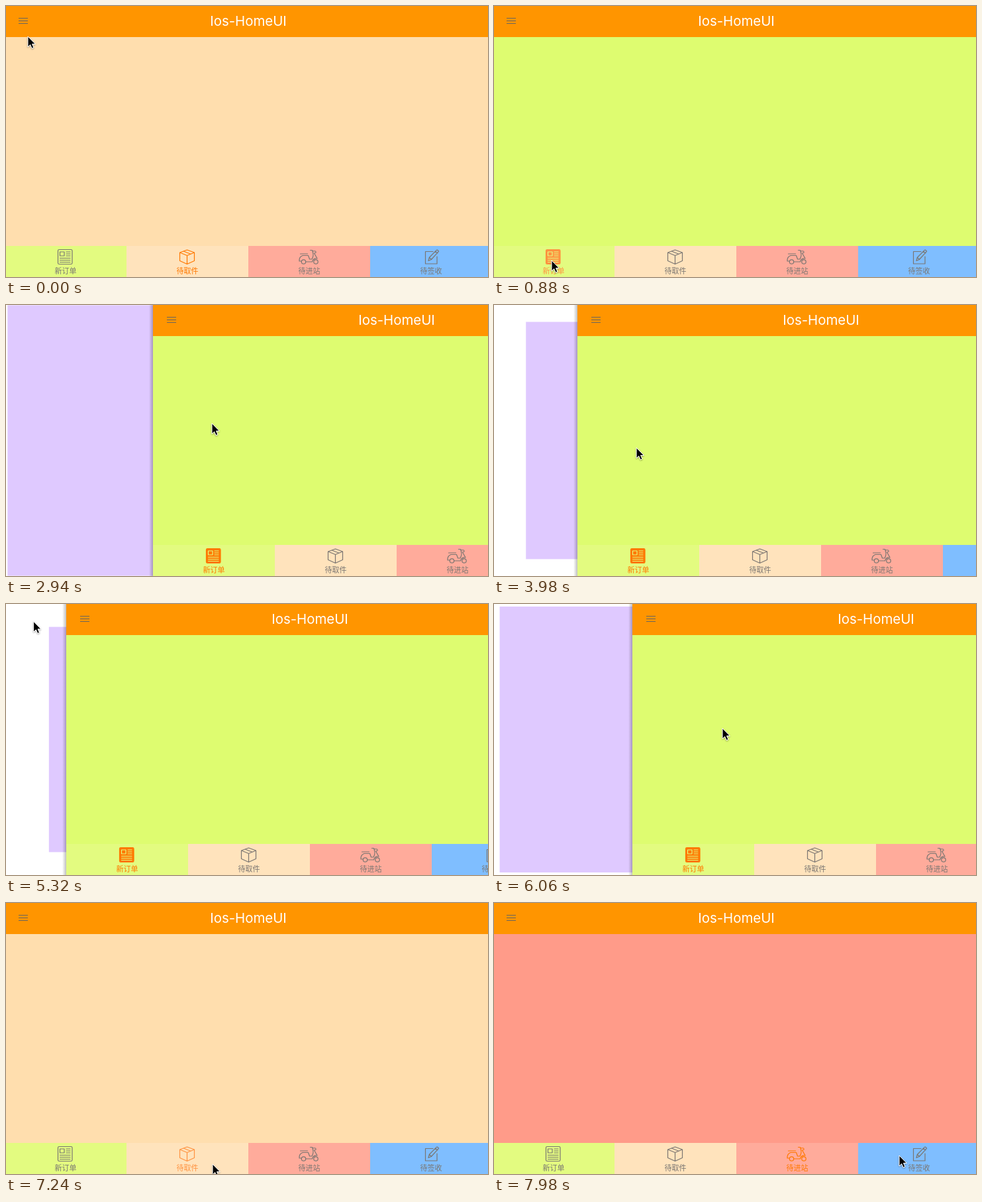
Animation, 728 px wide and 410 px high, one loop 8000 ms. Source, as an HTML page:

```html
<!DOCTYPE html>
<html lang="zh-CN">
<head>
<meta charset="utf-8">
<style>
  html, body { margin: 0; width: 100%; height: 100%; overflow: hidden; background: #fff; }
  svg { display: block; width: 728px; height: 410px; }
  .title { font: 20.4px Inter, "Liberation Sans", sans-serif; fill: #fff; text-anchor: middle; }
  .tab { color: #7a7672; }
  .tab.on { color: #ff7800; }
  .tab.pressed { color: #ff9340; }
  .tab text { font: 11px "Noto Sans CJK SC", "Noto Sans CJK", sans-serif; fill: currentColor; text-anchor: middle; }
  .icon { fill: none; stroke: currentColor; stroke-width: 1.2; stroke-linejoin: round; stroke-linecap: round; }
  .on .paper { fill: currentColor; }
  .on .print { stroke: #e3fb80; }
</style>
</head>
<body>
<svg viewBox="0 0 728 410">
  <defs>
    <linearGradient id="shade">
      <stop offset="0" stop-opacity="0"/>
      <stop offset="1" stop-opacity=".25"/>
    </linearGradient>
    <filter id="soft" x="-50%" y="-50%" width="200%" height="200%">
      <feDropShadow dx="0" dy="1" stdDeviation="1" flood-opacity=".4"/>
    </filter>
  </defs>

  <rect width="728" height="410" fill="#fff"/>
  <rect id="drawer" width="728" fill="#dfc9ff"/>

  <g id="page">
    <rect x="-6" width="6" height="410" fill="url(#shade)"/>
    <rect id="body" y="46" width="736" height="318"/>
    <rect width="736" height="47" fill="#ff9500"/>
    <path d="M21 18.5h14M21 22.5h14M21 26.5h14" stroke="#6b665e"/>
    <text class="title" x="368" y="30">Ios-HomeUI</text>

    <g class="tab" transform="translate(0 363)">
      <rect width="184" height="47" fill="#e3fb80"/>
      <g class="icon">
        <rect class="paper" x="80.5" y="5.5" width="21.5" height="22" rx="1.8"/>
        <path class="print" d="M83.5 9h6.500v6h-6.500zM93 9h6M93 12h6M93 15h6M83.500 18.500h15.500M83.500 21.500h15.500M83.500 24.500h15.500"/>
      </g>
      <text x="92" y="42">新订单</text>
    </g>

    <g class="tab" transform="translate(184 363)">
      <rect width="184" height="47" fill="#ffe3bc"/>
      <path class="icon" d="M80.5 10L91.5 6L102.5 10V22.500L91.500 27.500L80.500 22.500ZL91.500 14.500L102.500 10M91.500 14.500V27.500M86 8L97 12.300"/>
      <text x="92" y="42">待取件</text>
    </g>

    <g class="tab" transform="translate(368 363)">
      <rect width="184" height="47" fill="#ffab9b"/>
      <g class="icon">
        <circle cx="83.5" cy="24" r="3.2"/>
        <circle cx="102" cy="24" r="3.2"/>
        <path d="M80 23H77Q76.500 16.500 82 14.500H90.500Q92 18.500 92.500 20H96Q99 15 97.500 10L96.500 6.500H93.500M87 24H96.500Q98 18.500 104 19L99.500 11Q103.500 10.500 101.500 8L97 7.500M78.500 12H89.500"/>
      </g>
      <text x="92" y="42">待进站</text>
    </g>

    <g class="tab" transform="translate(552 363)">
      <rect width="184" height="47" fill="#7fbeff"/>
      <path class="icon" d="M95 8.500H83.500V27H101V16M88 22.500L89.300 17.500L100.500 6.200Q102 5.500 103.600 8.200L92.500 20.500ZM98.500 8.300L101.800 10.800M89.300 17.500L92.500 20.500"/>
      <text x="92" y="42">待签收</text>
    </g>
  </g>

  <path id="cursor" d="M0 0V16L3.7 12.600L6.100 18.200L8.900 17L6.500 11.600H11.300Z"
        fill="#000" stroke="#fff" filter="url(#soft)"/>
</svg>

<script>
  const LOOP = 8, STEPS = 54, STEP = 7.98 / STEPS, OPEN = 224;
  const bodyColors = ['#defc70', '#ffdeae', '#ff9b89'];
  const $ = id => document.getElementById(id);
  const tabs = [...document.querySelectorAll('.tab')];

  // Places where the pointer rests or turns.
  const stops = [
    { t: 0, x: 33, y: 46 },
    { t: 0.8, x: 87, y: 385 },
    { t: 1.3, x: 87, y: 385 },
    { t: 2.1, x: 87, y: 160 },
    { t: 4.4, x: 87, y: 221 },
    { t: 5, x: 41, y: 26 },
    { t: 5.3, x: 41, y: 26 },
    { t: 6.06, x: 345, y: 188 },
    { t: 6.4, x: 150, y: 220 },
    { t: 7.24, x: 312, y: 395 },
    { t: 7.98, x: 612, y: 382 }
  ];
  const taps = [{ t: -1, tab: 1 }, { t: 0.85, tab: 0 }, { t: 7.1, tab: 1 }, { t: 7.65, tab: 2 }];

  function ease(t, from, to) {
    const p = Math.min(1, Math.max(0, (t - from) / (to - from)));
    return p * p * (3 - 2 * p);
  }
  const openThenClose = (t, a, b, c, d) => OPEN * (ease(t, a, b) - ease(t, c, d));

  function pointer(t) {
    const place = { ...stops[0] };
    for (let i = 1; i < stops.length; i++) {
      const a = stops[i - 1], b = stops[i], p = ease(t, a.t, b.t);
      place.x += (b.x - a.x) * p;
      place.y += (b.y - a.y) * p;
    }
    return place;
  }

  function draw(time) {
    const t = Math.min(STEPS, Math.floor(time / STEP + 0.1)) * STEP;
    const dragged = openThenClose(t, 2.22, 2.42, 3.66, 4.39);
    const slide = dragged + openThenClose(t, 5.2, 5.47, 6, 6.4);
    const { x, y } = pointer(t);
    const tap = taps.filter(tap => tap.t <= t).pop();

    const top = 59.1 - 0.262 * slide;
    $('drawer').setAttribute('x', 109.5 - 0.4785 * slide);
    $('drawer').setAttribute('y', top);
    $('drawer').setAttribute('height', 410 - 2 * top);
    $('page').setAttribute('transform', `translate(${Math.round(slide) - 2} 0)`);
    $('cursor').setAttribute('transform', `translate(${x + dragged} ${y})`);
    $('body').setAttribute('fill', bodyColors[tap.tab]);
    tabs.forEach((tab, i) => {
      tab.classList.toggle('on', i === tap.tab);
      tab.classList.toggle('pressed', i === tap.tab && t - tap.t < 0.2);
    });
  }

  const start = performance.now();
  function tick() {
    draw((performance.now() - start) / 1000 % LOOP);
    requestAnimationFrame(tick);
  }
  tick();
</script>
</body>
</html>
```
